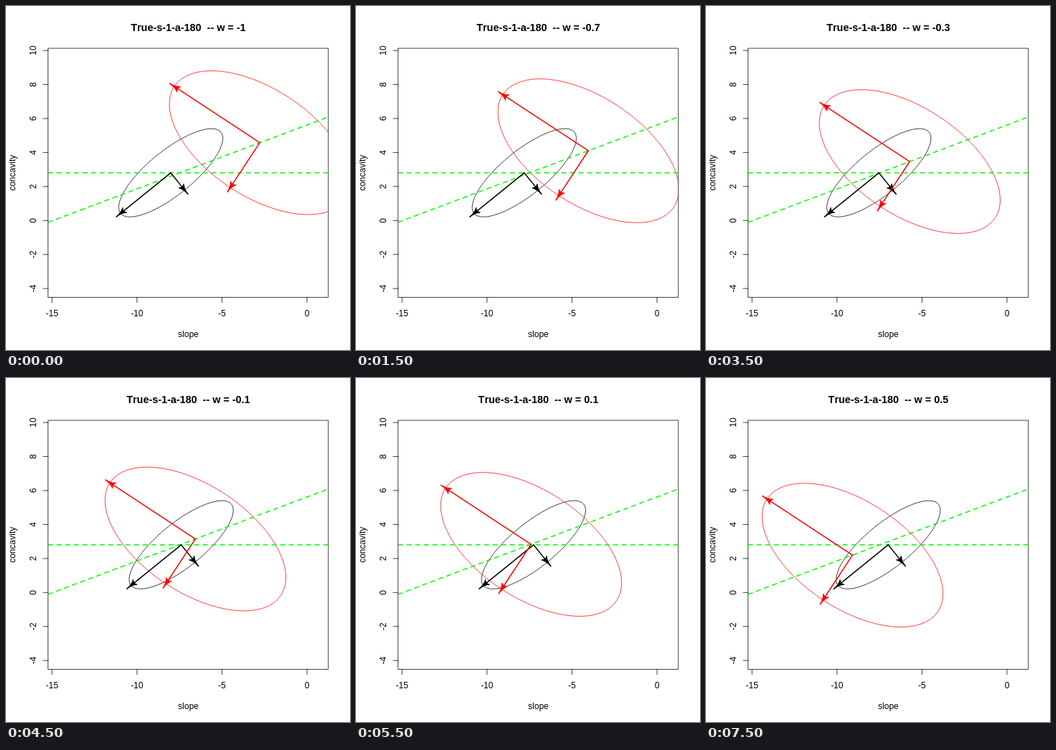
An HTML page with a canvas that plays this animation: 480 by 480 pixels, repeating every 8 s.

```html
<!DOCTYPE html>
<html>
<head>
<meta charset="utf-8">
<style>
html, body { margin: 0; width: 100%; height: 100%; overflow: hidden; background: #fff; }
canvas { display: block; width: 480px; height: 480px; }
</style>
</head>
<body>
<canvas id="stage"></canvas>
<script>
const canvas = document.getElementById('stage');
const ctx = canvas.getContext('2d');
const ratio = window.devicePixelRatio || 1;
canvas.width = canvas.height = 480 * ratio;

const STEP_MS = 500, STEPS = 16;
const LEFT = 59.04, RIGHT = 449.76, TOP = 59.04, BOTTOM = 406.56;
const MID_X = (LEFT + RIGHT) / 2, MID_Y = (TOP + BOTTOM) / 2;
const FONT = '"Liberation Sans", Arial, sans-serif';
const THIN = 0.75, THICK = 1.5;

const px = x => 420 + x * 23.72;
const py = y => 299.3 - y * 23.72;

function line(x1, y1, x2, y2) {
  ctx.beginPath();
  ctx.moveTo(x1, y1);
  ctx.lineTo(x2, y2);
  ctx.stroke();
}

function label(text, x, y, turned, font = '12px ') {
  ctx.save();
  ctx.translate(x, y);
  if (turned) ctx.rotate(-Math.PI / 2);
  ctx.font = font + FONT;
  ctx.fillText(text, 0, 0);
  ctx.restore();
}

function drawAxes(w) {
  ctx.fillStyle = ctx.strokeStyle = '#000';
  ctx.lineWidth = THIN;
  ctx.strokeRect(LEFT, TOP, RIGHT - LEFT, BOTTOM - TOP);
  for (let x = -15; x <= 0; x += 5) {
    line(px(x), BOTTOM, px(x), BOTTOM + 7.2);
    label(x, px(x), 432.6);
  }
  for (let y = -4; y <= 10; y += 2) {
    line(LEFT, py(y), LEFT - 7.2, py(y));
    label(y, 41.8, py(y), true);
  }
  label('slope', MID_X, 461.5);
  label('concavity', 13, MID_Y, true);
  label('True-s-1-a-180  -- w = ' + w, MID_X, 35, false, 'bold 14.4px ');
}

function drawEllipse({ x, y, a, b, angle, color }) {
  ctx.strokeStyle = color;
  ctx.lineWidth = THIN;
  ctx.beginPath();
  ctx.ellipse(x, y, a, b, angle, 0, 2 * Math.PI);
  ctx.stroke();
}

// Shaft along a semi-axis, with a curved head centred on its end
function drawArrow(x, y, length, angle) {
  ctx.save();
  ctx.translate(x, y);
  ctx.rotate(angle);
  line(0, 0, length, 0);
  ctx.translate(length, 0);
  ctx.beginPath();
  ctx.moveTo(7.3, 0);
  ctx.quadraticCurveTo(-1.25, 0, -7.3, 4);
  ctx.ellipse(-7.3, 0, 1.5, 4, 0, Math.PI / 2, -Math.PI / 2, true);
  ctx.quadraticCurveTo(-1.25, 0, 7.3, 0);
  ctx.fill();
  ctx.stroke();
  ctx.restore();
}

function drawAxesOf({ x, y, a, b, angle, side, color }) {
  ctx.strokeStyle = ctx.fillStyle = color;
  ctx.lineWidth = THICK;
  drawArrow(x, y, a, angle);
  drawArrow(x, y, b, angle + side * Math.PI / 2);
}

function drawGuides() {
  ctx.strokeStyle = '#0f0';
  ctx.lineWidth = THICK;
  ctx.setLineDash([6, 6]);
  line(LEFT, MID_Y, RIGHT, MID_Y);
  line(LEFT, 301.7, RIGHT, 154.8);
  ctx.setLineDash([]);
}

function draw(now) {
  const step = Math.floor(now / STEP_MS) % STEPS;
  const rad = Math.PI / 180;
  const shapes = [
    { x: 229.8 + 1.625 * step, y: MID_Y, a: 90.2, b: 31,
      angle: 141 * rad, side: -1, color: '#000' },
    { x: 354.1 - 9.98 * step, y: 190.7 + 3.76 * step, a: 142.9, b: 75,
      angle: 213.3 * rad, side: -1, color: '#f00' }
  ];

  ctx.setTransform(ratio, 0, 0, ratio, 0, 0);
  ctx.fillStyle = '#fff';
  ctx.fillRect(0, 0, 480, 480);
  ctx.lineCap = ctx.lineJoin = 'round';
  ctx.textAlign = 'center';
  ctx.fontKerning = 'none';

  drawAxes((step - 10) / 10);
  ctx.save();
  ctx.beginPath();
  ctx.rect(LEFT, TOP, RIGHT - LEFT, BOTTOM - TOP);
  ctx.clip();
  shapes.forEach(drawEllipse);
  drawGuides();
  shapes.forEach(drawAxesOf);
  ctx.restore();
}

const start = performance.now();
function tick() {
  draw(performance.now() - start);
  requestAnimationFrame(tick);
}
tick();
</script>
</body>
</html>
```
